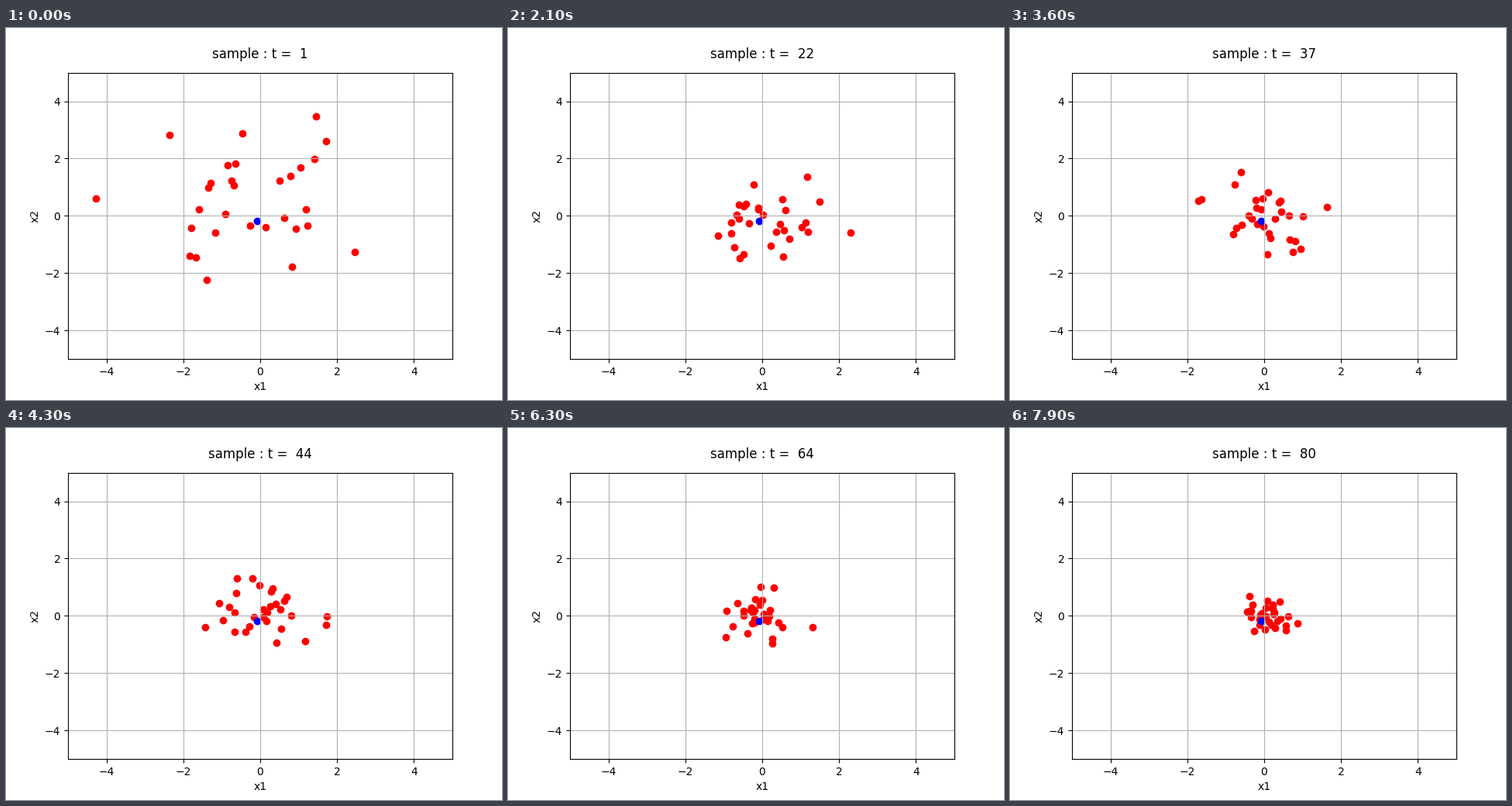
Write a matplotlib script that moves like this. It is 640 px wide and 480 px high and loops after 8 s.

```python
import numpy as np
import matplotlib.pyplot as plt
from matplotlib.animation import FuncAnimation

FRAMES = 80
COUNT = 30
BEST = (-0.08, -0.19)
DRIFT = np.array([-0.3, 0.55])  # initial offset of the swarm's centre

# Every coordinate swings as the real part of its own rotating complex number.
rng = np.random.default_rng(12)
shape = (COUNT, 2)
swing = rng.normal(size=shape) + 1j * rng.normal(size=shape)
swing = (swing - swing.mean(axis=0)) / swing.real.std(axis=0)
turns = rng.uniform(4, 9, shape)


def swarm(s):
    """Particle positions at progress s in 0..1."""
    settle = np.exp(-8 * s)
    spread = 0.95 - 0.6 * s + 0.5 * settle
    phase = np.exp(2j * np.pi * turns * s)
    return DRIFT * settle + spread * (swing * phase).real


fig, ax = plt.subplots(figsize=(6.4, 4.8), dpi=100)
ax.set(xlim=(-5, 5), ylim=(-5, 5), xlabel="x1", ylabel="x2")
ax.grid(True)
dots = ax.scatter(*swarm(0).T, c="red")
ax.scatter(*BEST, c="blue")
title = ax.text(0, 5.5, "", ha="center", fontsize=12)


def update(i):
    dots.set_offsets(swarm(i / (FRAMES - 1)))
    title.set_text(f"sample : t =  {i + 1}")
    return dots, title


anim = FuncAnimation(fig, update, frames=FRAMES, interval=100,
                     repeat=True, repeat_delay=0)
plt.show()
```
